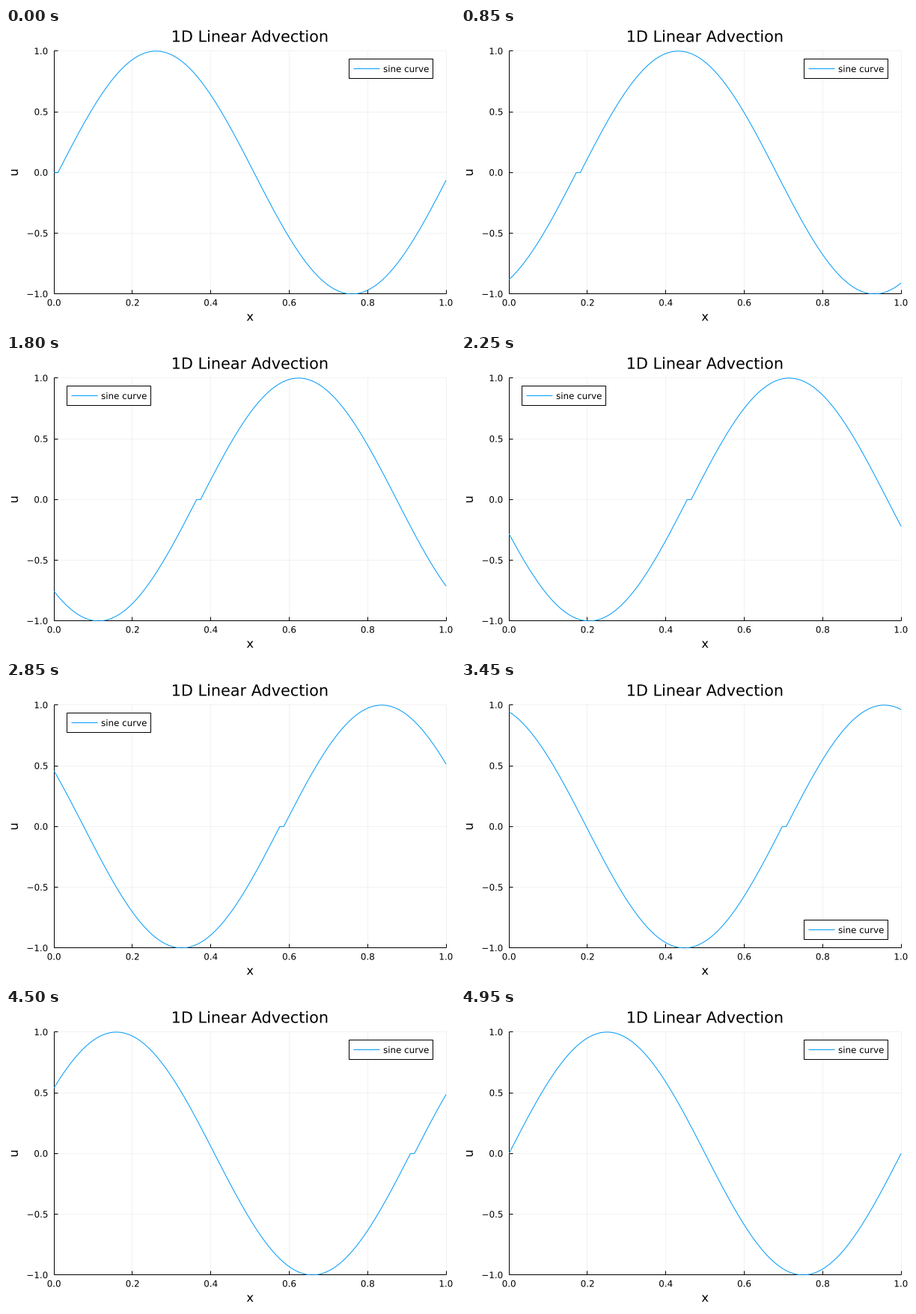
Animation, 600 px wide and 400 px high, one loop 5 s. Source, as a matplotlib script:

```python
import numpy as np
import matplotlib.pyplot as plt
from matplotlib.animation import FuncAnimation
from matplotlib.patches import PathPatch, Rectangle
from matplotlib.textpath import TextPath
from matplotlib.transforms import Affine2D

W, H, DPI = 600, 400, 100
PX = 72 / DPI  # points per pixel
TEXT_SCALE = 1.484  # pixels per unit of font size
LEFT, RIGHT, TOP, BOTTOM = 64.15, 588.1, 30.85, 355.85
BLUE = "#009AFA"
N = 100

fig = plt.figure(figsize=(W / DPI, H / DPI), dpi=DPI, facecolor="white")
ax = fig.add_axes([0, 0, 1, 1])
ax.set_xlim(0, W)
ax.set_ylim(H, 0)
ax.axis("off")


def to_px(x, y):
    return LEFT + x * (RIGHT - LEFT), BOTTOM - (y + 1) / 2 * (BOTTOM - TOP)


def line(x, y, color="black", **kw):
    return ax.plot(x, y, color=color, lw=PX, solid_capstyle="butt", **kw)[0]


def rule(x, y, **kw):
    """Straight line that fills whole pixel rows or columns."""
    return line(np.floor(x), np.floor(y), **kw)


def label(text, x, base, size, align=0.5, turn=0, **kw):
    """Text outline whose ink is aligned at x, sitting on a baseline."""
    path = TextPath((0, 0), text, size=size * TEXT_SCALE,
                    prop={"family": "DejaVu Sans"})
    ink = path.get_extents()
    place = (Affine2D().translate(-ink.x0 - align * ink.width, 0)
             .rotate_deg(turn).scale(1, -1).translate(x, base))
    patch = PathPatch(place.transform_path(path), fc="black", lw=0, **kw)
    return ax.add_patch(patch)


# Grid, ticks and tick labels
for v in np.linspace(0, 1, 6):
    x, _ = to_px(v, 0)
    rule([x, x], [TOP, BOTTOM], alpha=0.05, zorder=1)
    rule([x, x], [BOTTOM - 5, BOTTOM], zorder=2)
    label(f"{v:.1f}", x, 371.6, 8)
for v in np.linspace(-1, 1, 5):
    _, y = to_px(0, v)
    rule([LEFT, RIGHT], [y, y], alpha=0.05, zorder=1)
    rule([LEFT, LEFT + 5], [y, y], zorder=2)
    label(f"{v:.1f}".replace("-", "\u2212"), 55.4, y + 4.3, 8, align=1)

rule([LEFT, LEFT], [TOP, BOTTOM], zorder=2)
rule([LEFT, RIGHT], [BOTTOM, BOTTOM], zorder=2)

mid_x, mid_y = to_px(0.5, 0)
label("1D Linear Advection", mid_x, 18.5, 14)
label("x", mid_x, 391.6, 11)
label("u", 15.8, mid_y, 11, turn=90)

# Curve
xs = np.linspace(0, 1, N)
wave = np.sin(2 * np.pi * xs)
curve = line([], [], BLUE, zorder=3)
curve.set_clip_path(Rectangle((64, 30), 525, 326, transform=ax.transData))

# Legend, laid out for the top right corner
legend = [
    ax.add_patch(Rectangle((458, 41), 112, 26, fc="white", ec="black",
                           lw=PX, zorder=4)),
    line([464, 499], [54, 54], BLUE, zorder=5),
    label("sine curve", 504.7, 58.9, 8, align=0, zorder=5),
]


def legend_shift(u):
    """Offset to the first corner of the plot that the curve leaves free."""
    for up in (True, False):
        for right in (True, False):
            near_x = xs > 0.75 if right else xs < 0.25
            near_y = u > 0.5 if up else u < -0.5
            if not np.any(near_x & near_y):
                return (0 if right else -377), (0 if up else 277)
    return 0, 0


def update(i):
    u = np.roll(wave, i + 1)
    curve.set_data(*to_px(xs, u))
    move = Affine2D().translate(*legend_shift(u)) + ax.transData
    for part in legend:
        part.set_transform(move)
    return [curve, *legend]


anim = FuncAnimation(fig, update, frames=N, interval=50, repeat=True,
                     repeat_delay=0, blit=False)
plt.show()
```
